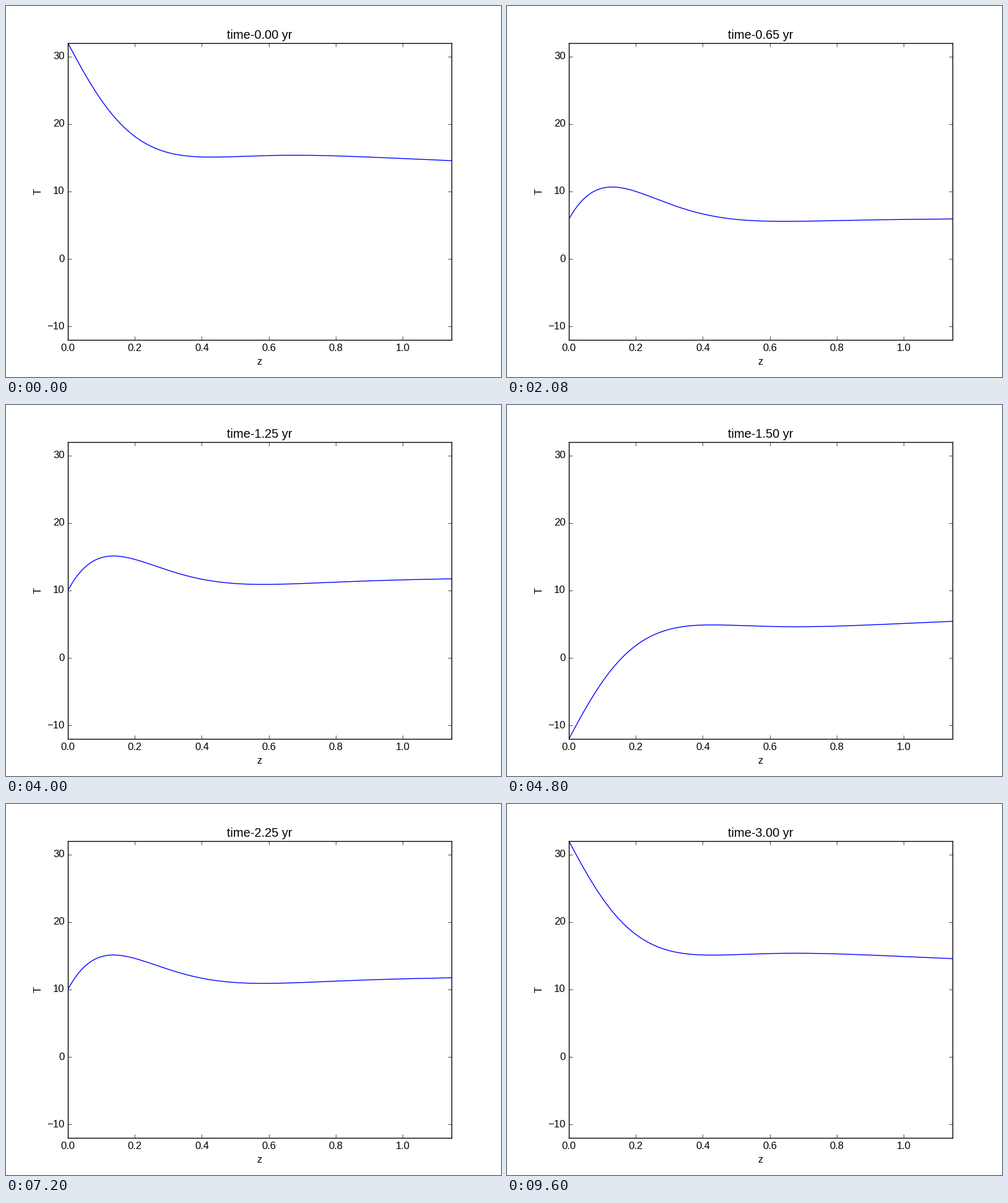
These frames come from a looping animation (800x600 px, 9760 ms). A matplotlib script:

```python
import numpy as np
import matplotlib.pyplot as plt
from matplotlib.animation import FuncAnimation

plt.style.use("classic")
plt.rcParams.update({
    "font.family": "Liberation Sans",
    "figure.facecolor": "white",
    "savefig.facecolor": "white",
    "savefig.dpi": 100,
})

# Soil temperature: annual and daily waves sinking by heat diffusion
DAY = 86400.0
YEAR = 365 * DAY
KAPPA = 1e-6
T_MEAN, A_YEAR, A_DAY = 10, 7, 15
STEP = 0.05  # years per frame
FRAMES = 61


def skin_depth(period):
    return np.sqrt(KAPPA * period / np.pi)


def wave(amp, period, z, t):
    u = z / skin_depth(period)
    return amp * np.exp(-u) * np.cos(2 * np.pi * t / period - u)


z_max = skin_depth(DAY) * np.log(1000)
z = np.linspace(0, z_max, 1000)

fig, ax = plt.subplots(figsize=(8, 6), dpi=100)
line, = ax.plot([], [], color="blue", lw=1)
ax.set(xlim=(0, z_max), ylim=(-12, 32), xlabel="z", ylabel="T",
       xticks=np.arange(0, 1.1, 0.2), yticks=range(-10, 31, 10))
title = ax.set_title("")


def update(i):
    years = i * STEP
    t = years * YEAR
    line.set_data(z, T_MEAN + wave(A_YEAR, YEAR, z, t) + wave(A_DAY, DAY, z, t))
    title.set_text(f"time-{years:.2f} yr")
    return line, title


anim = FuncAnimation(fig, update, frames=FRAMES, interval=160,
                     repeat=True, repeat_delay=0)
plt.show()
```
